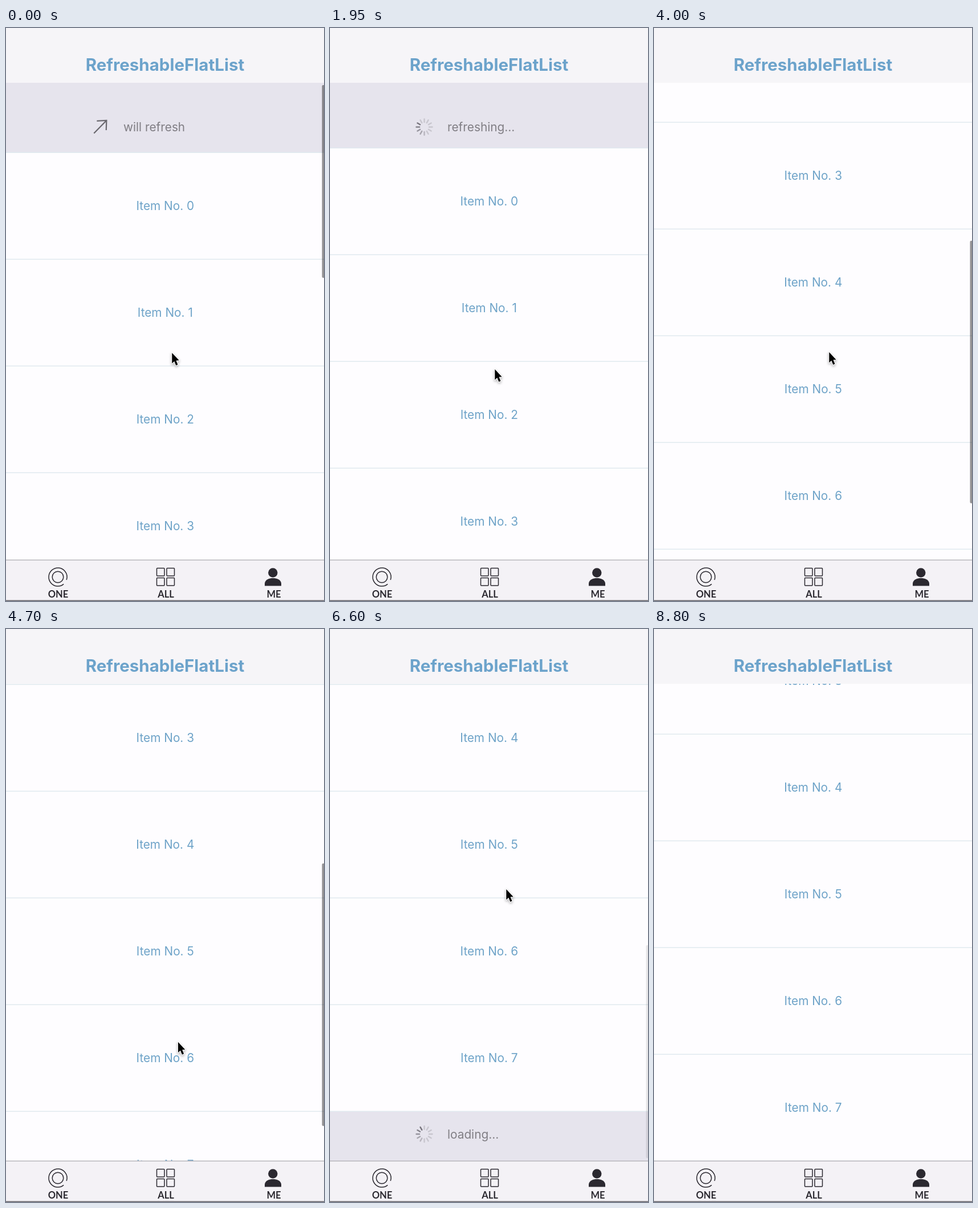
These frames come from a looping animation (558x1004 px, 9050 ms). An HTML page with a canvas:

```html
<!DOCTYPE html>
<html lang="en">
<head>
<meta charset="utf-8">
<title>RefreshableFlatList</title>
<style>
  html, body { margin: 0; width: 100%; height: 100%; overflow: hidden; background: #fefdff; }
  canvas { display: block; width: 100vw; height: 100vh; }
</style>
</head>
<body>
<canvas id="stage" width="558" height="1004"></canvas>
<script>
const ctx = document.getElementById('stage').getContext('2d');
const W = 558, H = 1004, LOOP = 9050;
const TOP = 96, BOTTOM = 932, VIEW = BOTTOM - TOP;
const ROW = 187, ITEMS = 8, MAX_SCROLL = ROW * ITEMS - VIEW;
const HEAD_REST = 114, FOOT_REST = 86;
const BLUE = '#6ea3c8', GREY = '#807e84', INK = '#2b2930', PANEL = '#e6e4ed';
const SANS = 'Inter, sans-serif';

// Moments of the story, in ms
const REFRESH = 500, REFRESHED = 2850, FLICK = 3190, DRAG = 4950;
const CROSS = 5750, LOAD = 6450, LOADED = 8300;

const ramp = (t, a, b) => Math.min(1, Math.max(0, (t - a) / (b - a)));
const ease = (t, a, b, power = 2) => 1 - (1 - ramp(t, a, b)) ** power;
const mix = (a, b, u) => a + (b - a) * u;
const turn = (t, a) => 180 * ramp(t, a, a + 190);

// Overscroll that resists the further it is dragged
const rubber = d => VIEW * (1 - 1 / (d * .55 / VIEW + 1));

function pointer(t) {
  const glides = [
    { from: 0, to: 450, x: 289, y: 597 },
    { from: 3050, to: 3280, x: 300, y: 740 },
    { from: 3280, to: 3700, x: 307, y: 567 },
    { from: 4300, to: 4900, x: 301, y: 742 },
    { from: DRAG, to: 5850, x: 303, y: 456 },
    { from: 5850, to: 6100, x: 309, y: 455 },
    { from: 8400, to: 8650, x: 590, y: 480 }
  ];
  let x = 291, y = 568;
  for (const g of glides) {
    const u = ease(t, g.from, g.to);
    x = mix(x, g.x, u);
    y = mix(y, g.y, u);
  }
  return { x, y };
}

// Overscroll after letting go: rest while busy, then close
const settle = (t, held, rest, release, done) =>
  mix(held, rest, ease(t, release, release + 250)) - rest * ease(t, done, done + 290);

function scroll(t) {
  const flicked = 560 * ease(t, FLICK, 4800, 3);
  if (t < FLICK) {
    const held = rubber(260 + pointer(Math.min(t, REFRESH)).y - 568);
    return -settle(t, held, HEAD_REST, REFRESH, REFRESHED);
  }
  if (t < DRAG) return flicked;
  const dragged = flicked + 742 - pointer(Math.min(t, LOAD)).y;
  if (dragged < MAX_SCROLL) return dragged;
  return MAX_SCROLL + settle(t, rubber(dragged - MAX_SCROLL), FOOT_REST, LOAD, LOADED);
}

function box(x, y, w, h, color) {
  ctx.fillStyle = color;
  ctx.fillRect(x, y, w, h);
}

function circle(x, y, r, from = 0, to = Math.PI * 2) {
  ctx.beginPath();
  ctx.arc(x, y, r, from, to);
}

function text(str, x, y, font, color, align = 'center') {
  ctx.font = font;
  ctx.textAlign = align;
  ctx.fillStyle = color;
  ctx.fillText(str, x, y);
}

function arrow(y, degrees) {
  ctx.save();
  ctx.translate(165.5, y - .5);
  ctx.rotate(degrees * Math.PI / 180);
  ctx.strokeStyle = '#6a686e';
  ctx.lineWidth = 2.2;
  ctx.beginPath();
  ctx.moveTo(0, 16);
  ctx.lineTo(0, -15.5);
  ctx.moveTo(-11.5, -3);
  ctx.lineTo(0, -15.5);
  ctx.lineTo(11.5, -3);
  ctx.stroke();
  ctx.restore();
}

function spinner(y, t, offset) {
  const head = (Math.floor(t * 12 / 1000) + offset) % 12;
  ctx.save();
  ctx.translate(165.5, y);
  ctx.lineWidth = 2.4;
  ctx.lineCap = 'round';
  for (let i = 0; i < 12; i++) {
    const age = (head - i + 12) % 12;
    ctx.strokeStyle = `rgba(80, 78, 86, ${Math.max(.2, .75 - age * .11)})`;
    ctx.beginPath();
    ctx.moveTo(0, -8.5);
    ctx.lineTo(0, -14);
    ctx.stroke();
    ctx.rotate(Math.PI / 6);
  }
  ctx.restore();
}

function prompt(str, y) {
  text(str, 206, y + 7.5, '20.8px ' + SANS, GREY, 'left');
}

function header(t, top) {
  box(0, TOP, W, top - TOP, PANEL);
  const y = Math.min(top - 35, 173.5);
  const busy = t >= REFRESH && t < REFRESHED;
  if (busy) spinner(y, t, 11);
  else arrow(y, 180 - turn(t, -142) + turn(t, REFRESHED));
  prompt(busy ? 'refreshing...' : t < REFRESH ? 'will refresh' : 'pull down to refresh', y);
}

function footer(t, top) {
  box(0, top, W, BOTTOM - top, PANEL);
  const busy = t >= LOAD && t < LOADED;
  const held = t >= CROSS && t < LOAD;
  const y = top + (busy || held ? 40 : 42.5);
  if (busy) spinner(y, t, 4);
  else arrow(y, turn(t, CROSS) - turn(t, LOADED));
  prompt(busy ? 'loading...' : held ? 'will load more' : 'pull up to load more', y);
}

function scrollBar(t, offset) {
  const shown = 1 - ramp(t, 850, 1050) + ramp(t, 3250, 3330) - ramp(t, LOAD, LOAD + 190);
  const inside = Math.min(MAX_SCROLL, Math.max(0, offset));
  const size = 460 - Math.abs(offset - inside);
  const y = offset > MAX_SCROLL ? 927 - size : 100 + inside * .555;
  ctx.fillStyle = `rgba(0, 0, 0, ${.42 * shown})`;
  ctx.beginPath();
  ctx.roundRect(554.5, y, 6, size, 2);
  ctx.fill();
}

function list(t) {
  const offset = scroll(t);
  const top = Math.round(TOP - offset);
  const end = top + ROW * ITEMS;
  ctx.save();
  ctx.beginPath();
  ctx.rect(0, TOP, W, VIEW);
  ctx.clip();
  if (top > TOP) header(t, top);
  if (end < BOTTOM) footer(t, end);
  for (let i = 0; i <= ITEMS; i++) {
    const y = top + i * ROW;
    box(0, y - .5, W, 1.5, '#e1eaef');
    if (i < ITEMS) text('Item No. ' + i, 279.3, y + 101, '20.8px ' + SANS, BLUE);
  }
  scrollBar(t, offset);
  ctx.restore();
}

function tabIcons() {
  ctx.strokeStyle = ctx.fillStyle = INK;
  ctx.lineWidth = 1.5;

  circle(91, 962, 16, Math.PI * .28, Math.PI * 2.1);
  ctx.stroke();
  circle(91, 962, 9.8);
  ctx.stroke();

  for (const x of [264.5, 282])
    for (const y of [946.5, 963.5]) {
      ctx.beginPath();
      ctx.roundRect(x, y, 13.5, 13.5, 1);
      ctx.stroke();
    }

  circle(468.3, 954.5, 8.2);
  ctx.fill();
  ctx.beginPath();
  ctx.moveTo(454, 977.5);
  ctx.lineTo(454, 973);
  ctx.bezierCurveTo(455, 966, 462, 964, 468.3, 964);
  ctx.bezierCurveTo(475, 964, 482, 966, 483, 973);
  ctx.lineTo(483, 977.5);
  ctx.fill();
}

function bars() {
  box(0, 0, W, TOP, '#f6f5f8');
  text('RefreshableFlatList', 279, 74.7, '700 29.5px ' + SANS, '#6ca3cb');
  box(0, BOTTOM, W, H - BOTTOM, '#f4f2f6');
  box(0, BOTTOM - .5, W, 1.5, '#b9b8bd');
  box(0, H - 1.5, W, 1.5, '#6a696e');
  tabIcons();
  const font = '700 16.5px Lato, sans-serif';
  text('ONE', 91.5, 997.7, font, INK);
  text('ALL', 280.5, 997.7, font, INK);
  text('ME', 470, 997.7, font, INK);
}

function cursor({ x, y }) {
  ctx.save();
  ctx.translate(x + .3, y + 1);
  ctx.beginPath();
  ctx.moveTo(0, 0);
  ctx.lineTo(0, 18.5);
  ctx.lineTo(4, 14.8);
  ctx.lineTo(7, 22);
  ctx.lineTo(10.2, 20.6);
  ctx.lineTo(7.2, 13.6);
  ctx.lineTo(12.4, 13.2);
  ctx.closePath();
  ctx.lineJoin = 'round';
  ctx.lineWidth = 2.2;
  ctx.strokeStyle = '#fff';
  ctx.shadowColor = 'rgba(0, 0, 0, .35)';
  ctx.shadowBlur = 4;
  ctx.shadowOffsetY = 2;
  ctx.stroke();
  ctx.shadowColor = 'transparent';
  ctx.fillStyle = '#000';
  ctx.fill();
  ctx.restore();
}

function draw(t) {
  box(0, 0, W, H, '#fefdff');
  list(t);
  bars();
  cursor(pointer(t));
}

const start = performance.now();
function frame() {
  draw((performance.now() - start) % LOOP);
  requestAnimationFrame(frame);
}
frame();
</script>
</body>
</html>
```
